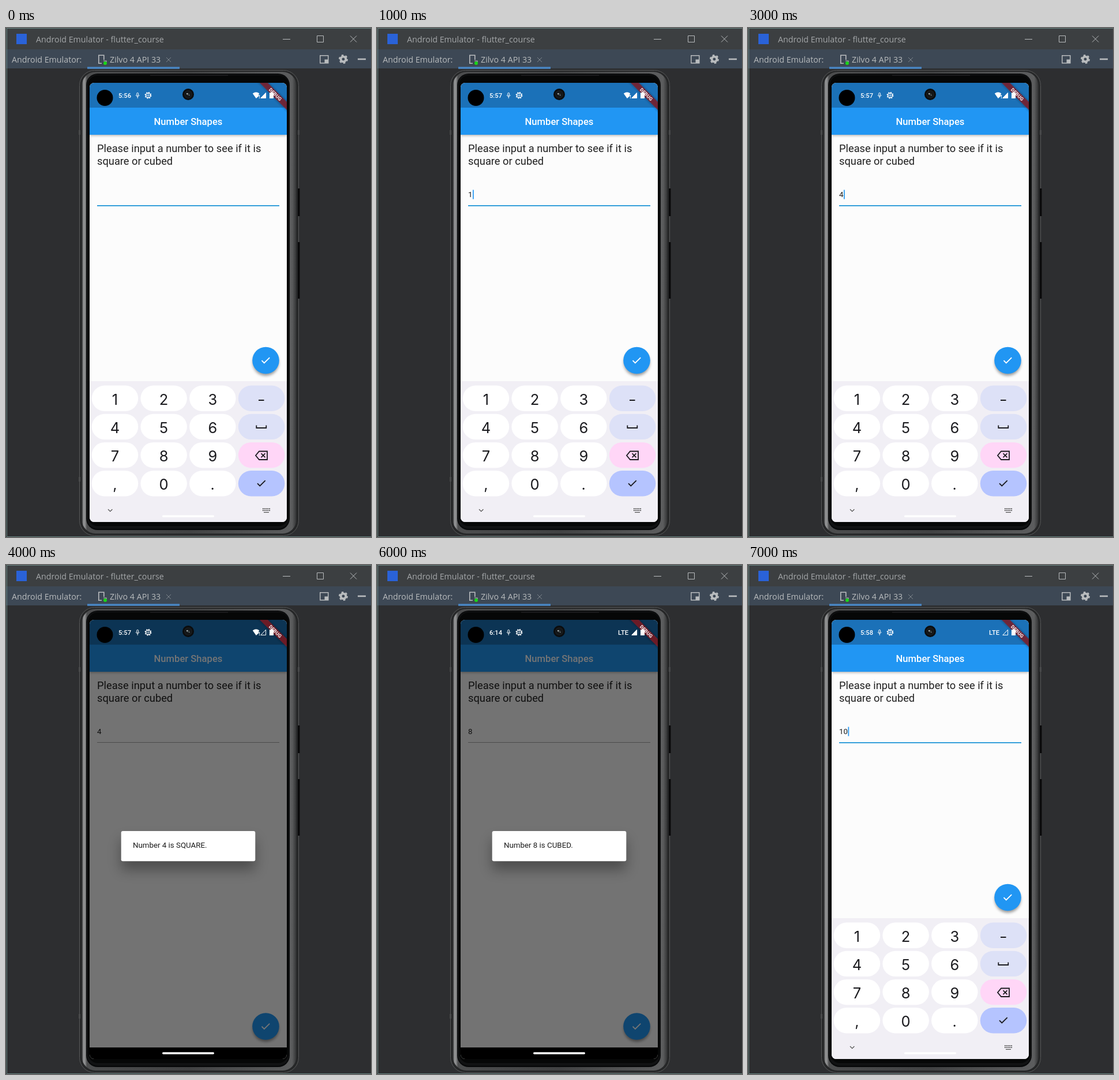
An HTML page that plays this animation: 633 px wide and 882 px high, repeating every 8000 ms.

```html
<!DOCTYPE html>
<html lang="en">
<head>
<meta charset="utf-8">
<title>Number Shapes</title>
<style>
  html, body { margin: 0; width: 100%; height: 100%; overflow: hidden; background: #2d2e30; }
  svg { display: block; }
  text { font-family: Roboto, sans-serif; white-space: pre; }
  .ui { font: 14.25px "Open Sans", sans-serif; fill: #b8bbbd; }
  .key { font: 25.5px Inter, sans-serif; fill: #1b1b1f; text-anchor: middle; }
  .status { font-size: 11.2px; font-weight: 500; fill: #fff; }
  .line { fill: none; stroke: currentColor; }
</style>
</head>
<body>
<svg width="633" height="882" viewBox="0 0 633 882">
  <defs>
    <linearGradient id="rim">
      <stop offset="0" stop-color="#333435"/>
      <stop offset=".008" stop-color="#939495"/>
      <stop offset=".015" stop-color="#8a8b8c"/>
      <stop offset=".024" stop-color="#4c4d4e"/>
      <stop offset=".5" stop-color="#414243"/>
      <stop offset=".98" stop-color="#5c5d5e"/>
      <stop offset="1" stop-color="#333435"/>
    </linearGradient>
    <radialGradient id="lens">
      <stop offset="0" stop-color="#3b4446"/>
      <stop offset=".5" stop-color="#101214"/>
      <stop offset="1" stop-color="#1b1e20"/>
    </radialGradient>
    <filter id="soft" x="-30%" y="-60%" width="160%" height="240%"><feGaussianBlur stdDeviation="11"/></filter>
    <filter id="blur" x="-30%" y="-30%" width="160%" height="160%"><feGaussianBlur stdDeviation="2.5"/></filter>
    <clipPath id="screen"><rect x="145" y="95" width="342" height="761" rx="8"/></clipPath>
    <path id="check" class="line" d="M-7 .2 l4.3 4.3 9.4 -9.4" stroke-width="1.8"/>
  </defs>

  <!-- emulator window -->
  <rect width="633" height="882" fill="#2d2e30"/>
  <rect width="633" height="37" fill="#3c3f41"/>
  <rect y="37" width="633" height="33" fill="#3d4855"/>
  <rect x="141" y="67.4" width="160" height="3.4" fill="#4a88c7"/>
  <path d="M633 .5H1.5V881.5H633" class="line" color="#66827f"/>
  <rect x="18" y="10" width="18" height="18" fill="#2a62d8"/>
  <text class="ui" x="52" y="25" style="fill:#a4a7a9">Android Emulator - flutter_course</text>
  <text class="ui" x="10" y="60">Android Emulator:</text>
  <text class="ui" x="180" y="60">Zilvo 4 API 33</text>
  <g class="line" color="#b9bcbe">
    <path d="M480 19.5h13M539.5 13.5h11v11h-11zM597 13.5l11 11m0-11l-11 11"/>
    <path d="M278 51l8 8m0-8l-8 8" stroke="#7d858c"/>
    <path d="M610 54h14" stroke-width="2.6"/>
    <rect x="544.8" y="47.8" width="14" height="13" stroke-width="1.5"/>
    <path d="M552.5 54.5h6.5v6.5h-6.5z" fill="#b9bcbe" stroke="none"/>
    <circle cx="585" cy="54" r="4.4" stroke-width="3.8"/>
    <circle cx="585" cy="54" r="6.8" stroke-width="2.4" stroke-dasharray="3.56"/>
    <path d="M166 61.3h-5.2v-14h9v8" stroke-width="1.6"/>
    <path d="M169 57h5v2" stroke-width="1.2"/>
  </g>
  <circle cx="172" cy="61" r="3" fill="#19d719"/>

  <!-- phone body -->
  <rect x="127.5" y="73.5" width="380" height="806" rx="26" fill="#262728" stroke="#58595a"/>
  <path d="M126 177h3v8h-3zM126 778h3v8h-3zM506 177h3v8h-3z" fill="#48494a"/>
  <path d="M506 278h3.5v48h-3.5zM506 371h3.5v98h-3.5z" fill="#0a0a0b"/>
  <rect x="131.5" y="76" width="372" height="800" rx="24" fill="url(#rim)"/>
  <rect x="139" y="79" width="353" height="791" rx="20" fill="#08090a"/>
  <rect x="140" y="80.5" width="351" height="787" rx="19" fill="#111213"/>
  <rect x="142" y="82" width="348" height="781" rx="17" fill="#060707"/>
  <path d="M250 82h135" class="line" color="#29292a"/>

  <g clip-path="url(#screen)">
    <rect x="145" y="95" width="342" height="761" fill="#fcfcfc"/>
    <rect x="145" y="142" width="342" height="44" filter="url(#blur)" opacity=".35"/>
    <rect x="145" y="138" width="342" height="47" fill="#2196f3"/>
    <rect x="145" y="95" width="342" height="43" fill="#1b71b8"/>
    <text x="316" y="167.5" font-size="16.64" font-weight="500" fill="#fff" text-anchor="middle">Number Shapes</text>
    <g font-size="18.3" fill="#202020">
      <text x="158" y="215">Please input a number to see if it is</text>
      <text x="158" y="236.5">square or cubed</text>
    </g>
    <text id="entry" x="158" y="292.7" font-size="13.3" fill="#1c1c1c"></text>
    <rect id="cursor" y="280.5" width="1.7" height="16" fill="#2196f3"/>
    <rect id="underline" x="158" width="316"/>
    <g id="fab">
      <circle cy="4" r="22.5" filter="url(#blur)" opacity=".4"/>
      <circle r="23.3" fill="#2196f3"/>
      <use href="#check" color="#fff"/>
    </g>

    <g id="keyboard">
      <rect x="145" y="612" width="342" height="244" fill="#f1eff5"/>
      <g id="keys"></g>
      <g class="line" color="#1b1b1f" stroke-width="1.8">
        <path d="M438 645h9.5M434.3 688.5v4.5h17v-4.5"/>
        <path d="M439 733.5h14v14.5h-14l-6-7.2zM442.5 737.2l7 7m0-7l-7 7"/>
        <use href="#check" x="443" y="789"/>
        <path d="M177 834l3.7 3.7 3.7-3.7" stroke="#555" stroke-width="1.3"/>
        <path d="M445 833h13M445 836h13" stroke="#555" stroke-dasharray="1.7 1.1"/>
        <path d="M447 839.3h9" stroke="#555" stroke-width="1.3"/>
      </g>
    </g>

    <g id="dialog">
      <rect x="145" y="95" width="342" height="741" opacity=".54"/>
      <rect x="145" y="836" width="342" height="20"/>
      <rect id="shade" filter="url(#soft)" opacity=".33"/>
      <rect id="card" rx="3" fill="#fff"/>
      <g font-size="13.33" fill="#1c1c1c">
        <text id="line0"></text>
        <text id="line1"></text>
      </g>
    </g>
    <rect x="271" y="844.3" width="90" height="3.4" rx="1.7" fill="#fff"/>

    <g transform="translate(487 95) rotate(45)">
      <rect x="-50" y="23.3" width="100" height="10" filter="url(#blur)" opacity=".35"/>
      <rect x="-50" y="23.3" width="100" height="10" fill="#8c1820" opacity=".75"/>
      <text y="31.3" font-size="8.5" font-weight="900" fill="#f0dfe2" text-anchor="middle">DEBUG</text>
    </g>
  </g>

  <!-- status bar -->
  <text id="clock" class="status" x="195" y="121"></text>
  <g class="line" color="#fff">
    <rect x="226.8" y="112.3" width="2.8" height="5" rx="1.4"/>
    <path d="M225 116.3q3.2 5 6.4 0M228.2 118.8v3"/>
    <circle cx="246.5" cy="116.7" r="4" stroke-width="1.4"/>
    <circle cx="246.5" cy="116.7" r="5.3" stroke-width="1.3" stroke-dasharray="2.08"/>
    <path d="M242.5 116.7h8M246.5 112.7v8" stroke-width=".7"/>
  </g>
  <path id="wifi" d="M427.8 113.5q6-4.5 11.6 0l-1.2 1.6v3l-4.4 4zM438.8 116h1.3v3.5h-1.3zM438.8 120.5h1.3v1.4h-1.3z" fill="#fff"/>
  <text id="lte" class="status" x="418" y="121">LTE</text>
  <path id="signal" d="M441.8 121.4h8.8v-9.2z" stroke="#fff"/>
  <path d="M457 112h2v-1.3h3v1.3h2v10h-7z" fill="#fff"/>
  <circle cx="171.5" cy="121" r="14"/>
  <circle cx="316" cy="115" r="10" fill="#0b0c0d"/>
  <circle cx="316" cy="115" r="7" fill="url(#lens)"/>
  <circle cx="314.2" cy="114" r="1.2" fill="#b3bdbd"/>
  <circle cx="318" cy="116.5" r=".9" fill="#697577"/>
</svg>

<script>
const $ = id => document.getElementById(id);
const set = (id, attrs) => Object.entries(attrs).forEach(([k, v]) => $(id).setAttribute(k, v));
const show = (id, on) => set(id, { display: on ? "inline" : "none" });

const labels = "123 456 789 ,0. ";
const actionColors = ["#dde1f7", "#dde1f7", "#ffd6f7", "#b5c4ff"];
$("keys").innerHTML = [...labels].map((label, i) => {
  const col = i % 4, row = i >> 2;
  const x = 148.7 + col * 84.7, y = 619.5 + row * 49.2;
  const fill = col < 3 ? "#fff" : actionColors[row];
  return `<rect x="${x}" y="${y}" width="80.5" height="44.4" rx="22.2" fill="${fill}"/>
    <text class="key" x="${x + 40.2}" y="${y + 33}">${label}</text>`;
}).join("");

// One state per second; a state with a message shows the dialog.
const states = [
  { clock: "5:56", entry: "" },
  { clock: "5:57", entry: "1" },
  { clock: "5:57", entry: "1", message: ["Number 1 is neither CUBED nor", "SQUARE."] },
  { clock: "5:57", entry: "4" },
  { clock: "5:57", entry: "4", message: ["Number 4 is SQUARE."], weak: true },
  { clock: "6:13", entry: "8", lte: true },
  { clock: "6:14", entry: "8", message: ["Number 8 is CUBED."], lte: true },
  { clock: "5:58", entry: "10", lte: true, weak: true },
];

function showState({ clock, entry, message, lte, weak }) {
  const typing = !message;
  $("clock").textContent = clock;
  $("entry").textContent = entry;
  show("lte", lte);
  show("wifi", !lte);
  set("signal", { fill: weak ? "none" : "#fff" });
  show("keyboard", typing);
  show("dialog", !typing);
  show("cursor", typing && entry);
  set("cursor", { x: 158.5 + entry.length * 7.5 });
  set("underline", typing
    ? { y: 307, height: 1.8, fill: "#2196d8" }
    : { y: 307, height: 1, fill: "#a4a4a4" });
  set("fab", { transform: `translate(450.5 ${typing ? 576 : 799.5})` });
  if (typing) return;

  const wide = message.length > 1;
  const x = wide ? 178 : 199.7, y = wide ? 453 : 461;
  const box = { x, y, width: 632 - 2 * x, height: wide ? 68 : 52.3 };
  set("card", box);
  set("shade", { ...box, y: y + 15 });
  [0, 1].forEach(i => {
    $("line" + i).textContent = message[i] || "";
    set("line" + i, { x: x + 20.2, y: y + 29 + i * 15.8 });
  });
}

let current = -1;
function tick(now) {
  const index = Math.floor(now / 1000) % states.length;
  if (index !== current) showState(states[current = index]);
  requestAnimationFrame(tick);
}
tick(performance.now());
</script>
</body>
</html>
```
